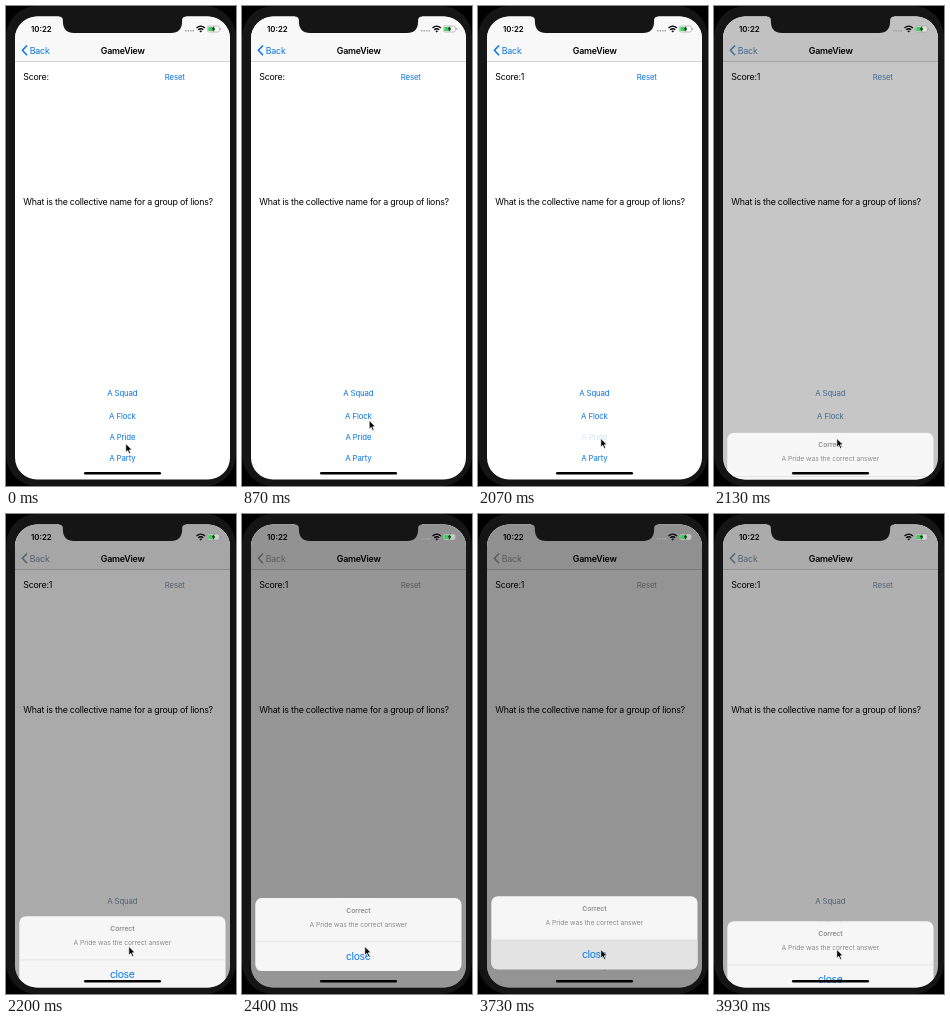
These frames come from a looping animation (230 px wide and 480 px high, 3.99 s). An HTML page:

```html
<!DOCTYPE html>
<html lang="en">
<head>
<meta charset="utf-8">
<title>GameView</title>
<style>
  html, body { margin: 0; width: 100%; height: 100%; overflow: hidden; background: #000; }
  svg { display: block; width: 230px; height: 480px; --tint: #0a74e0; }
  text { font-family: Inter, "Open Sans", sans-serif; }
  .body { font-size: 8.83px; letter-spacing: -.225px; }
  .button { font-size: 7.8px; letter-spacing: -.125px; fill: var(--tint); }
  .bold { font-weight: 600; }
  .mid { text-anchor: middle; }
  .note { font-size: 6.75px; letter-spacing: -.08px; fill: #8c8c8c; }
  .close { font-size: 10.38px; letter-spacing: -.35px; fill: #0a78ea; }
</style>
</head>
<body>
<svg viewBox="0 0 230 480">
  <defs>
    <clipPath id="screen"><rect x="9" y="10.5" width="215" height="463" rx="22"/></clipPath>
    <clipPath id="card"><rect x="13.3" y="382.3" width="206.2" height="73" rx="6.5"/></clipPath>
  </defs>
  <rect width="230" height="480" rx="31" fill="#151515"/>

  <g clip-path="url(#screen)">
    <rect x="9" y="10" width="215" height="464" fill="#fff"/>
    <rect x="9" y="10" width="215" height="45" fill="#f8f8f8"/>
    <rect x="9" y="55" width="215" height=".6" fill="#b4b4b4"/>
    <path d="M21 39.4 L16.4 44.3 L21 49.2" fill="none" stroke="var(--tint)" stroke-width="1.5"/>
    <text class="body" x="23.8" y="47.5" fill="var(--tint)">Back</text>
    <text class="body bold mid" x="116.7" y="47.5">GameView</text>
    <text class="body" id="score" x="17.3" y="74.2">Score:</text>
    <text class="button" x="158.7" y="73.6">Reset</text>
    <text class="body" x="17.3" y="199.1">What is the collective name for a group of lions?</text>
    <text class="button mid" x="116.4" y="389.7">A Squad</text>
    <text class="button mid" x="116.4" y="413.4">A Flock</text>
    <text class="button mid" id="pride" x="116.4" y="434.3">A Pride</text>
    <text class="button mid" x="116.4" y="455.3">A Party</text>

    <rect id="dim" x="9" y="10" width="215" height="464" opacity="0"/>

    <g id="sheet">
      <g clip-path="url(#card)">
        <rect x="13" y="382" width="207" height="74" fill="#f8f8f8" fill-opacity=".98"/>
        <rect id="press" x="13" y="426" width="207" height="30" fill="#e3e3e3"/>
        <rect x="13" y="425.7" width="207" height=".5" fill="#d2d2d2"/>
      </g>
      <text class="note bold mid" x="116.4" y="396.8">Correct</text>
      <text class="note mid" x="116.4" y="411">A Pride was the correct answer</text>
      <text class="close mid" x="116.2" y="444.2">close</text>
    </g>

    <text class="bold" x="25" y="26" font-size="7.8">10:22</text>
    <path d="M179 24.7h9" stroke="#a5a5a5" stroke-width="1.4" stroke-dasharray="1.5 1"/>
    <g fill="none" stroke="#000" stroke-width="1.3">
      <path d="M190.5 21.9 Q194.7 18.3 198.9 21.9"/>
      <path d="M192.2 23.8 Q194.7 21.7 197.2 23.8"/>
    </g>
    <path d="M193.3 24.9 Q194.7 23.9 196.1 24.9 L194.7 26.4Z"/>
    <rect x="201.4" y="20" width="12" height="6" rx="1.7" fill="#fff" fill-opacity=".5" stroke="#999" stroke-width=".6"/>
    <rect x="202.3" y="20.9" width="6" height="4.2" rx=".9" fill="#39cf5c"/>
    <path d="M208.3 20.1 L205.9 23.3 H207.4 L206.8 25.9 L209.3 22.6 H207.8Z"/>
    <path d="M214.3 22v2q1-.2 1-1t-1-1" fill="#999"/>
    <rect x="78" y="465.9" width="77" height="2.7" rx="1.35"/>
  </g>

  <path d="M53 9 V10.5 Q56.7 10.5 56.9 14.2 V16 Q57.4 27 68 27 H165 Q175.6 27 176.1 16 V14.2 Q176.3 10.5 180 10.5 V9Z" fill="#151515"/>
  <path id="cursor" d="M0 0V8.8L2 6.9L3.4 10.1L4.9 9.5L3.5 6.3H6.2Z" stroke="#fff" stroke-width=".7"/>
</svg>

<script>
  const LOOP = 3990, TICK = 1000 / 15;
  const $ = id => document.getElementById(id);
  const svg = document.querySelector("svg");

  // tick, x, y of the pointer tip
  const path = [
    [7, 119.8, 437.6], [10, 121, 430], [13, 127.2, 414.4], [15, 133, 407.5],
    [16, 136, 401], [18, 135, 386], [20, 126, 409], [22, 115, 436], [23, 113, 443],
    [25, 116, 443], [28, 122.8, 432.4], [42, 122.8, 432.4], [44, 122.8, 435.4]
  ];

  function pointer(k) {
    if (k <= path[0][0]) return path[0].slice(1);
    const i = path.findIndex(p => p[0] > k);
    if (i < 0) return path.at(-1).slice(1);
    const [ka, xa, ya] = path[i - 1], [kb, xb, yb] = path[i];
    const u = (k - ka) / (kb - ka);
    return [xa + (xb - xa) * u, ya + (yb - ya) * u];
  }

  // Distance of the sheet below its resting place
  function sheetOffset(k) {
    if (k < 32) return 95;
    if (k >= 58) return k === 58 ? 6 : 25;
    return k < 38 ? 20 * 0.45 ** (k - 33) : 0;
  }

  function draw() {
    const t = performance.now() % LOOP;
    const k = Math.min(59, Math.floor((t + 4) / TICK));
    const offset = sheetOffset(k);
    const shown = Math.max(0, 1 - offset / 95);
    const [x, y] = pointer(k);

    $("cursor").setAttribute("transform", `translate(${x} ${y})`);
    $("sheet").setAttribute("transform", `translate(0 ${offset})`);
    $("dim").setAttribute("opacity", 0.42 * shown);
    $("press").setAttribute("opacity", k >= 56 && k < 59 ? 1 : 0);
    $("pride").setAttribute("opacity", k >= 29 && k < 32 ? 0.18 : 1);
    $("score").textContent = k >= 31 ? "Score:1" : "Score:";
    svg.style.setProperty("--tint", `color-mix(in srgb, #999 ${shown * 100}%, #0a74e0)`);
    requestAnimationFrame(draw);
  }
  draw();
</script>
</body>
</html>
```
